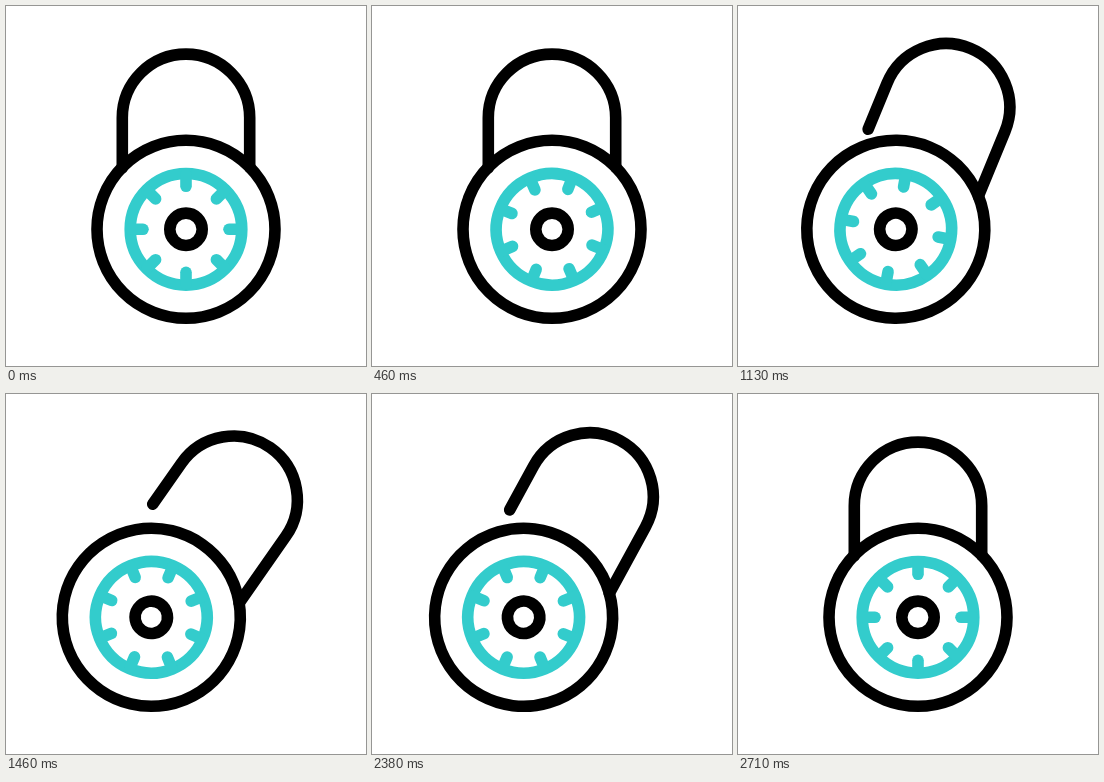
These frames come from a looping animation (360x360 px, 3000 ms). An HTML page:

```html
<!DOCTYPE html>
<html lang="en">
<head>
<meta charset="utf-8">
<title>Combination padlock</title>
<style>
  html, body { margin: 0; height: 100%; overflow: hidden; background: #fff; }
  svg { display: block; width: 100vw; height: 100vh; fill: none; stroke: #000; stroke-width: 11.6; stroke-linecap: round; }
  #dial { stroke: #33cccc; }
</style>
</head>
<body>
<svg viewBox="0 0 360 360">
  <g id="lock">
    <path id="shackle"/>
    <circle r="89"/>
    <g id="dial"><circle r="55.8"/></g>
    <circle r="16.2"/>
  </g>
</svg>
<script>
const LOOP = 3000, FPS = 24;
const TURN = 213, TURN_END = 21;
const OPEN_START = 22, OPEN_END = 35, CLOSE_START = 49, CLOSE_END = 65;

const [lock, shackle, dial] = ["lock", "shackle", "dial"].map(id => document.getElementById(id));
const progress = (n, from, to) => Math.min(1, Math.max(0, (n - from) / (to - from)));

for (let angle = 0; angle < 360; angle += 45) {
  const tick = document.createElementNS("http://www.w3.org/2000/svg", "path");
  tick.setAttribute("d", "M0-55V-43");
  tick.setAttribute("transform", `rotate(${angle})`);
  dial.append(tick);
}

function draw(now) {
  // Step at the frame rate; the offset absorbs rounding of frame times to 10 ms
  const n = Math.floor((now % LOOP) * FPS / 1000 + 0.2);
  const closing = n >= CLOSE_START;
  const open = closing
    ? 1 - progress(n, CLOSE_START, CLOSE_END) ** 2.45
    : 1 - (1 - progress(n, OPEN_START, OPEN_END)) ** 2.1;
  const turn = TURN * (closing ? open : progress(n, 0, TURN_END));
  const y = -111.5 - 32 * open;

  lock.setAttribute("transform", `translate(${180 - 34.7 * open} 223.3) rotate(${35 * open})`);
  shackle.setAttribute("d", `M-63.7 ${y + 50}V${y}a63.7 63.7 0 0 1 127.4 0V-62`);
  dial.setAttribute("transform", `rotate(${turn})`);
}

function loop() {
  draw(performance.now());
  requestAnimationFrame(loop);
}
loop();
</script>
</body>
</html>
```
